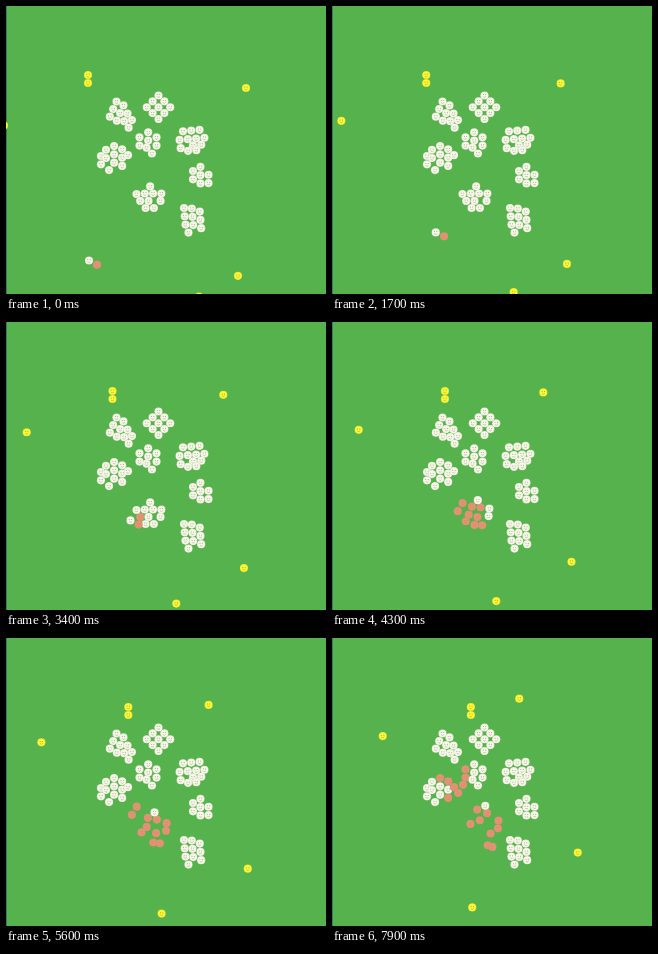
An HTML page with a canvas for the animation above (8000 ms loop, 320 px wide and 288 px high).

```html
<!DOCTYPE html>
<html lang="en">
<head>
<meta charset="utf-8">
<title>Smiley crowds</title>
<style>
html, body { margin: 0; width: 320px; height: 288px; overflow: hidden; background: #56b24c; }
canvas { display: block; }
</style>
</head>
<body>
<canvas id="stage" width="320" height="288"></canvas>
<script>
const ctx = document.getElementById('stage').getContext('2d');
const LOOP = 8000, STEP = 100;
const PITCH = 8.3;   // distance between neighbours
const SPREAD = 0.17; // seconds from one catch to the next
const rad = deg => deg * Math.PI / 180;

// A crowd is made of straight runs of touching balls: [across, along, count] in pitches
function crowd(x, y, turn, runs) {
  const c = Math.cos(rad(turn)), s = Math.sin(rad(turn));
  return runs.flatMap(([across, along, count]) =>
    Array.from({ length: count }, (_, i) => {
      const u = across * PITCH, v = (along + i) * PITCH;
      return { x: x + u * c - v * s, y: y + u * s + v * c, vx: 0, vy: 0, from: 0, red: Infinity };
    }));
}

// Balls turn red one after another
function infect(balls, time, order) {
  order.forEach((n, k) => { balls[n].red = time + k * SPREAD; });
  return balls;
}

// Each ball drifts off on its heading, the nearer to the impact the faster
function push(balls, time, headings) {
  balls.forEach((b, i) => {
    const speed = 3.4 - 0.07 * (b.x - 146), a = rad(headings[i]);
    b.vx = speed * Math.cos(a);
    b.vy = speed * Math.sin(a);
    b.from = time;
  });
  return balls;
}

const bumped = crowd(139.6, 202, -90,
  [[0, 0, 2], [0.85, -0.65, 2], [0.85, 1.8, 1], [1.75, -0.1, 3], [2.6, 0.55, 1]]);
const lowerLeft = crowd(95, 150, 0,
  [[0, 0, 2], [0.6, -0.75, 2], [0.97, 1.7, 1], [1.58, -1.2, 3], [2.55, -0.8, 3], [3.25, -0.1, 1]]);
const middle = crowd(133.5, 131.3, 0,
  [[0, 0, 2], [1.05, -0.6, 2], [0.85, 1.25, 1], [2.05, 0, 2], [1.5, 1.95, 1]]);

const balls = [
  crowd(110.5, 95.5, 23.6, [[0, 0, 3], [0.96, 0.1, 3], [1.8, 0.8, 2], [2.6, 1.3, 2]]),
  crowd(152.5, 89.5, 45, [[0, 0, 3], [1, 0, 3], [2, 0, 3]]),
  crowd(177, 125.3, -95, [[0, 0, 3], [-1, -0.5, 4], [-2, -0.45, 1], [-1.8, 1.05, 2], [-2.4, 0.4, 2]]),
  crowd(187, 165, 0, [[0, 0, 2], [0.9, -0.5, 3], [1.87, 0.45, 2]]),
  crowd(178, 202, -5, [[0, 0, 3], [0.93, 0.15, 3], [1.85, 0.6, 3], [0.28, 3, 1]]),
  push(infect(bumped, 3.4, [2, 0, 3, 5, 1, 6, 4, 7]), 3.5, [18, 29, -43, 2, -22, -68, -57, -24, -54]),
  infect(lowerLeft, 7.1, [11, 10, 8, 5]),
  infect(middle, 7.6, [1, 0])
].flat();

// Runners move at one speed until they hit something, then at another
const runners = [
  { x: 91, y: 258.7, vx: 12.4, vy: -16.7, hit: 3.35, nx: 1.3, ny: -3.7, red: 0 },
  { x: 83, y: 254.5, vx: 12.2, vy: -16.5, hit: 3.5, nx: 0.1, ny: -9.5, red: 3.5 },
  { x: 130.5, y: 188, vx: 0, vy: 0, hit: 3.57, nx: 0.1, ny: -9.5, red: 3.6 }
];

// Yellow walkers all stride at much the same pace: x, y, heading
const PACE = 7.2;
const walkers = [
  [82, 69, 0], [82, 77, 0], [240, 82, 202], [-2, 119.4, -22], [232, 269.8, -76], [193, 290.7, 202]
];

const skins = {
  white: { fill: '#f8f8ea', edge: '#d6e6c4', ink: '#9b9c89' },
  yellow: { fill: '#fdf735', edge: '#d3de38', ink: '#a09a2c' },
  red: { fill: '#e49275', edge: '#c39a68', ink: '#d98468' }
};

function disc(x, y, r, fill) {
  ctx.fillStyle = fill;
  ctx.beginPath();
  ctx.arc(x, y, r, 0, Math.PI * 2);
  ctx.fill();
}

function smiley(x, y, kind) {
  const s = skins[kind];
  disc(x, y, 4.1, s.edge);
  disc(x, y, 3.6, s.fill);
  disc(x - 1.2, y - 0.9, 0.5, s.ink);
  disc(x + 1.2, y - 0.9, 0.5, s.ink);
  ctx.strokeStyle = s.ink;
  ctx.lineWidth = 0.5;
  ctx.beginPath();
  ctx.arc(x, y + 0.1, 1.7, 0.5, Math.PI - 0.5);
  ctx.stroke();
}

function draw(t) {
  const skin = b => t >= b.red ? 'red' : 'white';
  ctx.fillStyle = '#56b24c';
  ctx.fillRect(0, 0, 320, 288);
  ctx.fillStyle = '#2f7f62';
  ctx.fillRect(0, 0, 1, 288);
  for (const b of balls) {
    const dt = Math.max(0, t - b.from);
    smiley(b.x + b.vx * dt, b.y + b.vy * dt, skin(b));
  }
  for (const r of runners) {
    const before = Math.min(t, r.hit), after = t - before;
    smiley(r.x + r.vx * before + r.nx * after, r.y + r.vy * before + r.ny * after, skin(r));
  }
  for (const [x, y, heading] of walkers) {
    const d = PACE * t, a = rad(heading);
    smiley(x + d * Math.cos(a), y + d * Math.sin(a), 'yellow');
  }
}

// The level pair is a little slower, the upward walker a little faster
walkers.forEach(w => { w[3] = 1; });

const start = performance.now();
function tick() {
  const ms = (performance.now() - start) % LOOP;
  draw(Math.floor(ms / STEP) * STEP / 1000);
  requestAnimationFrame(tick);
}
tick();
</script>
</body>
</html>
```
